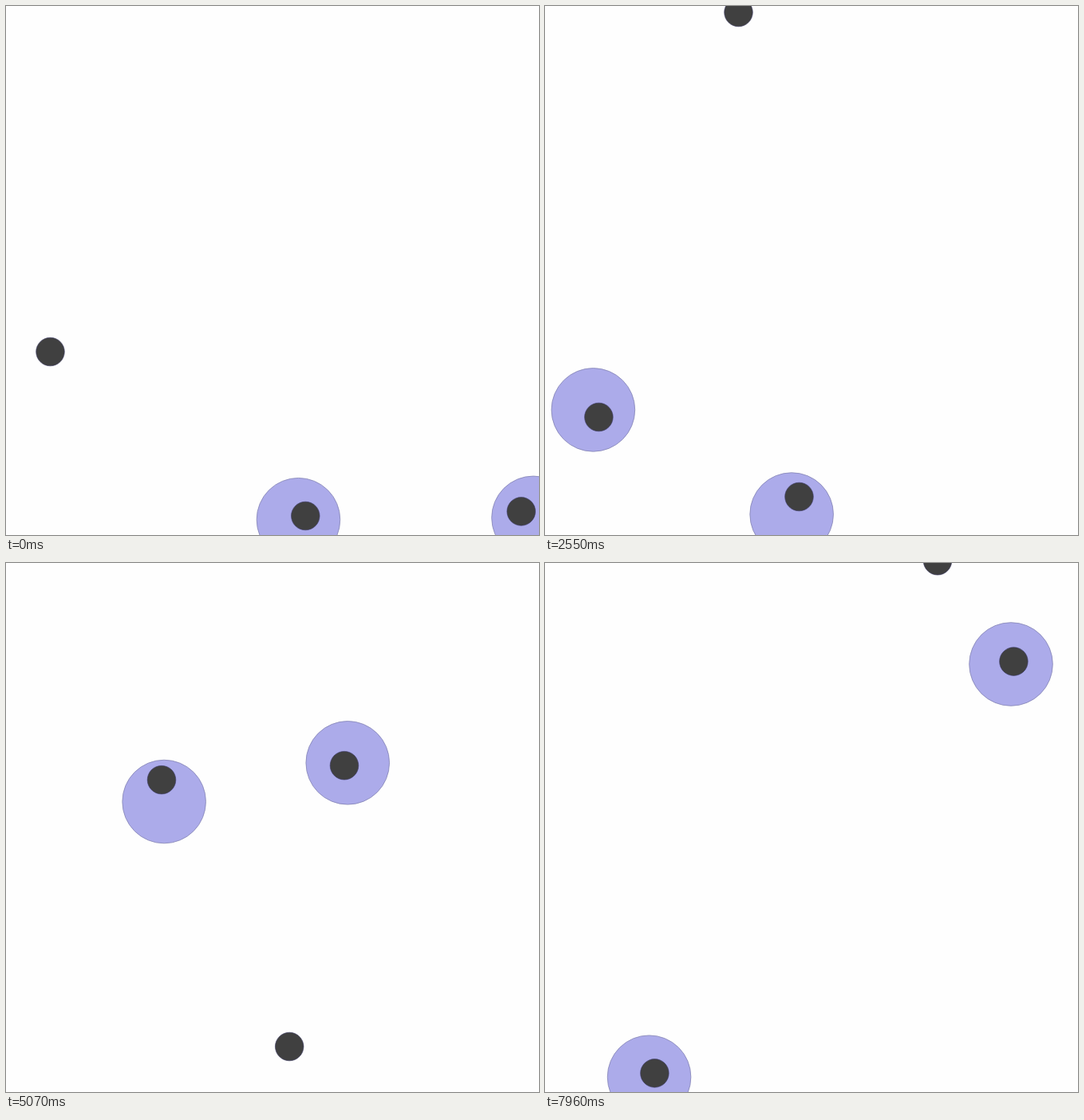
Animation, 668 px wide and 664 px high, one loop 8 s. Source, as an HTML page:

```html
<!DOCTYPE html>
<html lang="en">
<head>
<meta charset="utf-8">
<title>Circles chasing dots</title>
<style>
  html, body { margin: 0; width: 100%; height: 100%; overflow: hidden; background: #fefefe; }
  svg { display: block; width: 100%; height: 100%; }
  .ring { fill: #acabea; stroke: #8584b4; stroke-width: .8; }
  .dot { fill: #404040; stroke: #3c3a66; stroke-width: .6; }
</style>
</head>
<body>
<svg id="stage" viewBox="0 0 668 664"></svg>
<script>
const LOOP = 8000;
const REACTION = 330;  // from new dots to the rings' landing
const REACH = 260;     // duration of the jump
const DECAY = 160, SWING = 130;
const AWAY = { x: 500, y: 800 };

const at = (x, y) => ({ x, y });
const ring = (land, rest) => ({ land, rest });

// Each phase shows new dots; the rings land, then swing to rest
const phases = [
  { time: 0,
    dots: [at(55.5, 434), at(375.3, 640), at(645.7, 634.4)],
    rings: [ring(at(366.4, 644.7), at(376, 648)), ring(at(661, 642.4), at(658, 634)), ring(AWAY, AWAY)] },
  { time: 1730,
    dots: [at(242.5, 8), at(67.4, 516), at(318.5, 616)],
    rings: [ring(at(76.7, 519.6), at(60.3, 506.8)), ring(at(266.2, 580.6), at(309.4, 638.4)), ring(AWAY, AWAY)] },
  { time: 4300,
    dots: [at(195, 272.2), at(424, 254.2), at(355.2, 607)],
    rings: [ring(at(190.2, 279), at(198.2, 299.7)), ring(at(405.2, 279.6), at(428.4, 250.6)), ring(AWAY, AWAY)] },
  { time: 6630,
    dots: [at(492, -2.8), at(137.4, 640.4), at(587.4, 123.6)],
    rings: [ring(at(293.4, 590.2), at(130.6, 645.2)), ring(at(543, 127), at(584, 127)), ring(at(477, 711.4), AWAY)] }
];

const stage = document.getElementById("stage");

function addCircle(kind, r) {
  const node = document.createElementNS("http://www.w3.org/2000/svg", "circle");
  node.setAttribute("class", kind);
  node.setAttribute("r", r);
  stage.append(node);
  return node;
}

function place(node, p) {
  node.setAttribute("cx", p.x);
  node.setAttribute("cy", p.y);
}

const mix = (a, b, u) => at(a.x + (b.x - a.x) * u, a.y + (b.y - a.y) * u);
const ease = u => u * u * (3 - 2 * u);
const swing = s => Math.exp(-s / DECAY) * Math.cos(s / SWING);

const latest = (t, lead) => phases.findLast(phase => phase.time - lead <= t);

function ringAt(i, t) {
  const phase = latest(t, REACH), index = phases.indexOf(phase);
  const { land, rest } = phase.rings[i];
  const since = t - phase.time;
  return since < 0
    ? mix(phases[index - 1].rings[i].rest, land, ease(1 + since / REACH))
    : mix(rest, land, swing(since));
}

const rings = phases[0].rings.map(() => addCircle("ring", 52.3));
const dots = phases[0].dots.map(() => addCircle("dot", 17.8));

function draw(t) {
  rings.forEach((node, i) => place(node, ringAt(i, t)));
  const shown = latest(t, REACTION).dots;
  dots.forEach((node, i) => place(node, shown[i]));
}

const start = performance.now();
function tick() {
  draw((performance.now() - start) % LOOP);
  requestAnimationFrame(tick);
}
tick();
</script>
</body>
</html>
```
